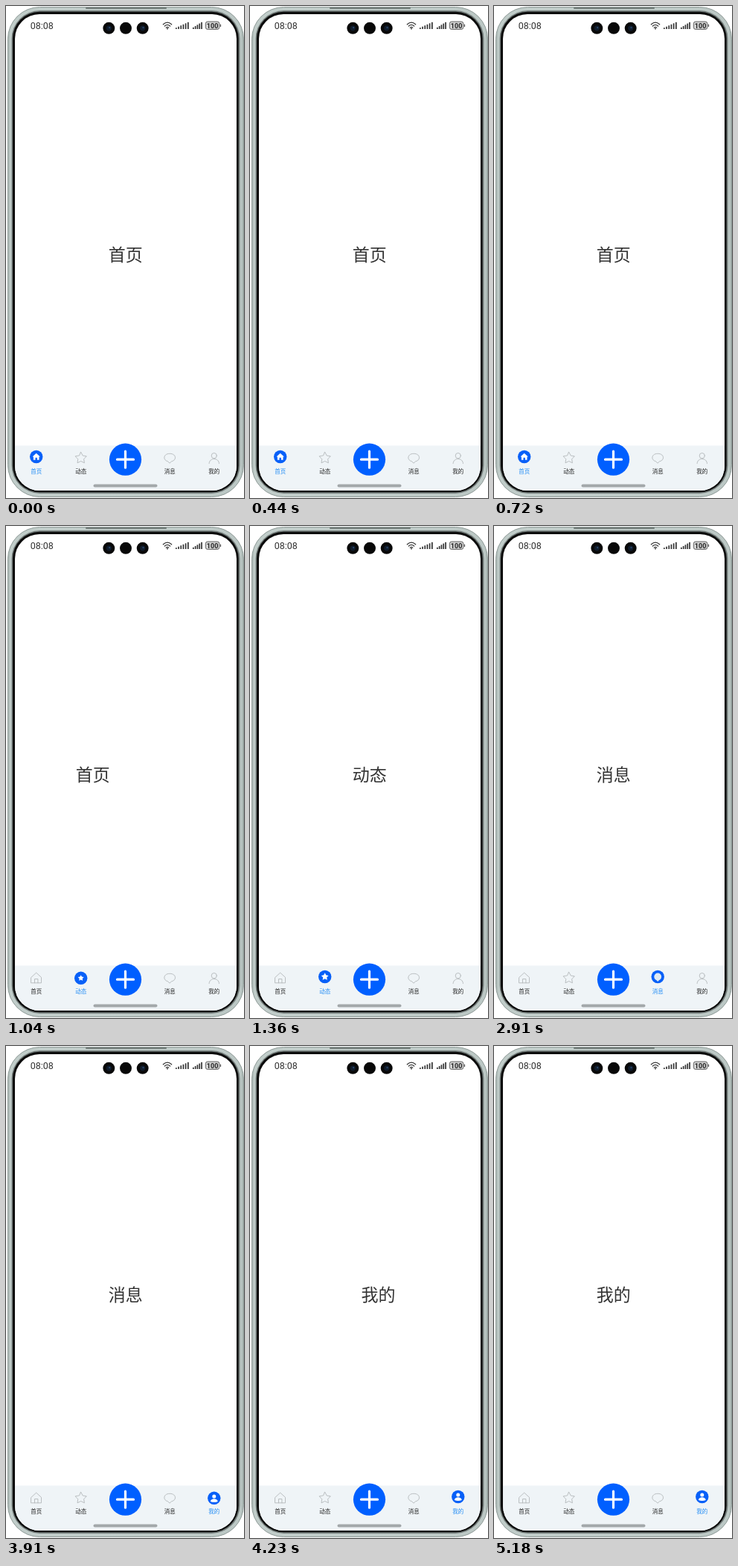
An HTML page for the animation above (5340 ms loop, 320x662 px).

```html
<!DOCTYPE html>
<html lang="zh-CN">
<head>
<meta charset="utf-8">
<title>Tab bar</title>
<style>
  html, body { margin: 0; width: 100%; height: 100%; overflow: hidden; background: #fff; }
  svg { display: block; width: 100%; height: 100%; }
  text { text-anchor: middle; font-family: "Noto Sans CJK SC", "Noto Sans CJK", "Noto Sans", sans-serif; }
  .page { font-size: 23px; fill: #333; }
  .label { font-size: 7.5px; fill: #222; }
  .tab.on .label { fill: #238df5; }
  .off-icon { fill: none; stroke: #b4b8ba; stroke-width: .9; stroke-linejoin: round; stroke-linecap: round; }
  .on-icon { display: none; }
  .tab.on .on-icon { display: inline; }
  .tab.on .off-icon { display: none; }
</style>
</head>
<body>
<svg viewBox="0 0 320 662">
  <defs>
    <linearGradient id="metal" x1="0" x2="1" y1="0" y2="0">
      <stop offset="0" stop-color="#a9b5b1"/>
      <stop offset=".012" stop-color="#c1cdca"/>
      <stop offset=".988" stop-color="#bcc8c5"/>
      <stop offset="1" stop-color="#a6b2ae"/>
    </linearGradient>
    <clipPath id="screen"><rect x="12" y="11" width="298" height="641" rx="33"/></clipPath>
  </defs>

  <g id="phone">
    <rect x="2.5" y="1.5" width="317" height="659" rx="43" fill="url(#metal)" stroke="#8d9996"/>
    <rect x="7.5" y="6" width="307" height="650" rx="38" fill="#737c7a"/>
    <rect x="9" y="7.8" width="303.7" height="646.4" rx="36" fill="#0b0b0b"/>
    <rect x="107" y="2" width="109" height="2" rx="1" fill="#727c79"/>
    <rect x="12" y="11" width="298" height="641" rx="33" fill="#fff"/>
  </g>

  <g clip-path="url(#screen)">
    <g id="pages"></g>
    <rect x="12" y="591.5" width="298" height="61" fill="#eff4f7"/>
    <g id="tabs"></g>
    <circle cx="160.5" cy="610.2" r="21.6" fill="#005fff"/>
    <path d="M149.5 610.2h22M160.5 599.2v22" stroke="#fff" stroke-width="3.2" stroke-linecap="round"/>
    <rect x="117.5" y="643.5" width="86" height="4" rx="2" fill="#a3a8aa"/>
  </g>

  <g id="status">
    <text x="48.2" y="31" style="font:12.5px Roboto,sans-serif" fill="#303030">08:08</text>
    <g id="cameras"></g>
    <g fill="none" stroke="#333" stroke-width="1.2" stroke-linecap="round">
      <path d="M211.3 24.8Q217 19.6 222.7 24.8M213.3 27Q217 23.8 220.7 27M215.2 29.1Q217 27.6 218.8 29.1"/>
    </g>
    <circle cx="217" cy="30.6" r="1" fill="#333"/>
    <g id="bars" fill="#333"></g>
    <rect x="268.3" y="21" width="18.6" height="10.4" rx="2.8" fill="#d2d2d2" stroke="#555" stroke-width=".9"/>
    <rect x="287.8" y="24.4" width="1.3" height="3.6" rx=".6" fill="#555"/>
    <text x="277.6" y="29.6" style="font:bold 9px Roboto,sans-serif" fill="#222">100</text>
  </g>
</svg>

<script>
const LOOP = 5340, PAGE_WIDTH = 298, SLIDE = 400, STEP = 40;
const TABS = [
  { name: '首页', x: 40.7,
    off: '<path d="M-6.8-1 0-7.2 6.8-1V6.5H-6.8ZM-2.2 6.5V1.2H2.2V6.5"/>',
    on: '<path d="M-5.2 0 0-4.8 5.2 0H3.8V4.2H1.2V1.2H-1.2V4.2H-3.8V0Z" fill="#fff"/>' },
  { name: '动态', x: 100.7,
    off: `<path d="${star(8)}"/>`,
    on: `<path d="${star(5.2)}" fill="#fff"/>` },
  { name: '消息', x: 220.2,
    off: '<path d="M-3 4.3C-9.5 3-9-6 0-6S9.5 3 2.5 4.4L0 6.6Z"/>',
    on: '<circle r="4.9" fill="#dfeaf3"/><path class="tail" d="M-4 2 0 6.6 4 2Z" fill="#dfeaf3"/>' },
  { name: '我的', x: 279.8,
    off: '<circle cy="-3.2" r="3.6"/><path d="M-6.7 7.2C-6.4-1 6.4-1 6.7 7.2"/>',
    on: '<circle cy="-2.4" r="2.5" fill="#fff"/><path d="M-4.9 4.6C-4.7-.4 4.7-.4 4.9 4.6Q0 6.4-4.9 4.6Z" fill="#fff"/>' }
];
// grid: time the frame clock is aligned to; tap: tab switches; start: page begins to slide
const SWITCHES = [
  { grid: 600, tap: 940, start: 957 },
  { grid: 2230, tap: 2345, start: 2361 },
  { grid: 3910, tap: 3910, start: 3929 }
];
const $ = id => document.getElementById(id);
const clamp = v => Math.min(1, Math.max(0, v));

function star(r) {
  let d = '';
  for (let i = 0; i < 10; i++) {
    const a = -Math.PI / 2 + i * Math.PI / 5, k = i % 2 ? r * .52 : r;
    d += (i ? 'L' : 'M') + (k * Math.cos(a)).toFixed(2) + ' ' + (k * Math.sin(a)).toFixed(2);
  }
  return d + 'Z';
}

// cubic-bezier(.4, 0, .2, 1)
function ease(x) {
  if (x <= 0) return 0;
  if (x >= 1) return 1;
  let lo = 0, hi = 1, s;
  for (let i = 0; i < 24; i++) {
    s = (lo + hi) / 2;
    const bx = 1.2 * s * (1 - s) ** 2 + .6 * s * s * (1 - s) + s ** 3;
    if (bx < x) lo = s; else hi = s;
  }
  return s * s * (3 - 2 * s);
}

$('pages').innerHTML = TABS.map((tab, i) =>
  `<text class="page" x="${160.7 + i * PAGE_WIDTH}" y="342.7">${tab.name}</text>`).join('');

$('tabs').innerHTML = TABS.map(tab => `<g class="tab" transform="translate(${tab.x} 0)">
  <g class="off-icon" transform="translate(0 608.3)">${tab.off}</g>
  <g class="on-icon"><circle r="8.7" fill="#0860f8"/><g class="glyph">${tab.on}</g></g>
  <text class="label" y="628.8">${tab.name}</text></g>`).join('');

$('cameras').innerHTML = [138.3, 161, 183.7].map((x, i) =>
  `<circle cx="${x}" cy="29.8" r="8" fill="#080808"/>` +
  (i === 1 ? '' : `<circle cx="${x}" cy="29.8" r="3.6" fill="#101c2c"/><circle cx="${x + .8}" cy="29.2" r="1.1" fill="#28466a"/>`)).join('');

const bars = (x, count, gap, low) => Array.from({ length: count }, (_, i) => {
  const h = low + (9.2 - low) * i / (count - 1);
  return `<rect x="${x + i * gap}" y="${31 - h}" width="1.7" height="${h}"/>`;
}).join('');
$('bars').innerHTML = bars(228, 6, 3.2, 1.8) + bars(251, 5, 2.8, 2.2);

const tabNodes = [...document.querySelectorAll('.tab')];
const tail = document.querySelector('.tail');

function render(time) {
  let selected = 0, position = 0, age = LOOP;
  for (const { grid, tap, start } of SWITCHES) {
    if (time < grid) break;
    const now = grid + Math.floor((time - grid) / STEP) * STEP;
    if (now < tap) break;
    selected++;
    age = now - tap;
    position = selected - 1 + ease((now - start) / SLIDE);
  }
  $('pages').setAttribute('transform', `translate(${-position * PAGE_WIDTH} 0)`);

  const rise = ease(clamp((age - 125) / 200));
  tabNodes.forEach((node, i) => {
    node.classList.toggle('on', i === selected);
    if (i !== selected) return;
    node.querySelector('.on-icon').setAttribute('transform', `translate(0 ${608.3 - 1.8 * rise})`);
    const scale = i === 1 ? .8 + .2 * rise : 1;
    node.querySelector('.glyph').setAttribute('transform', `scale(${scale})`);
  });
  tail.setAttribute('opacity', rise);
}

const began = performance.now();
function tick() {
  render((performance.now() - began) % LOOP);
  requestAnimationFrame(tick);
}
tick();
</script>
</body>
</html>
```
